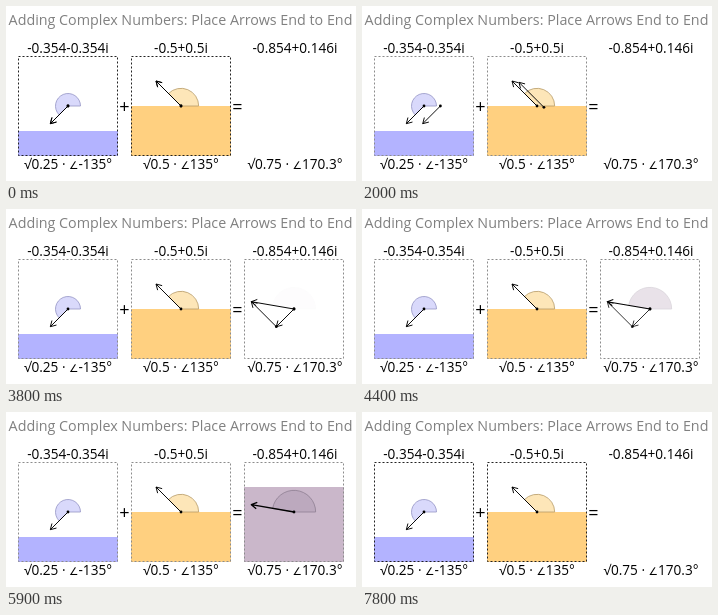
An HTML page for the animation above (7900 ms loop, 350x175 px).

```html
<!DOCTYPE html>
<html lang="en">
<head>
<meta charset="utf-8">
<title>Adding Complex Numbers</title>
<style>
  html, body { margin: 0; width: 100%; height: 100%; overflow: hidden; background: #fff; }
  svg { display: block; width: 100vw; height: 100vh; }
  text { font-family: "Open Sans", "Noto Sans", "DejaVu Sans", sans-serif; text-anchor: middle; font-size: 13.6px; }
  .title { font-size: 14.3px; fill: #808080; }
  .sign { font-size: 18px; }
  .angle { font-size: 10.5px; }
  .frame { fill: none; stroke-dasharray: 2 2; }
  .line { fill: none; stroke: #000; stroke-linejoin: round; }
</style>
</head>
<body>
<svg id="stage" viewBox="0 0 350 175"></svg>
<script>
const LOOP = 7900, STEP = 100, UNIT = 50, MID = 100;
const stage = document.getElementById('stage');

const terms = [
  { x: 62, re: -0.35355, im: -0.35355, fill: '#b3b3ff', fan: '#d9d9fb', edge: '#9595c4',
    sum: '-0.354-0.354i', root: '√0.25', angle: '-135°' },
  { x: 175, re: -0.5, im: 0.5, fill: '#ffd080', fan: '#fde6b8', edge: '#b79b68',
    sum: '-0.5+0.5i', root: '√0.5', angle: '135°' },
  { x: 288, re: -0.85355, im: 0.14645, fill: '#cab7ca', fan: '#bca9be', edge: '#8f7f92',
    sum: '-0.854+0.146i', root: '√0.75', angle: '170.3°' }
];

function add(parent, name, attrs, text) {
  const el = document.createElementNS('http://www.w3.org/2000/svg', name);
  for (const key in attrs) el.setAttribute(key, attrs[key]);
  if (text) el.textContent = text;
  parent.appendChild(el);
  return el;
}

const label = (x, y, text, cls = '') => add(stage, 'text', { x, y, class: cls }, text);

// Arrow with its tail at the local origin.
function arrow(parent, z) {
  const g = add(parent, 'g', { 'stroke-width': 0.9 });
  const x = z.re * UNIT, y = -z.im * UNIT;
  const len = Math.hypot(x, y), turn = Math.atan2(y, x) * 180 / Math.PI;
  add(g, 'circle', { r: 1.4 });
  add(g, 'path', {
    d: `M0 0H${len}m-5.5 -3.2L${len} 0l-5.5 3.2`,
    class: 'line', transform: `rotate(${turn})`
  });
  return g;
}

// Sector swept counterclockwise from the positive real axis.
function fanPath(z) {
  const r = Math.hypot(z.re, z.im) * UNIT / 2;
  const a = (Math.atan2(z.im, z.re) + 2 * Math.PI) % (2 * Math.PI);
  const large = a > Math.PI ? 1 : 0;
  return `M0 0H${r}A${r} ${r} 0 ${large} 0 ${r * Math.cos(a)} ${-r * Math.sin(a)}Z`;
}

function panel(z) {
  const g = add(stage, 'g', {});
  const at = `translate(${z.x} ${MID})`;
  const height = (z.re ** 2 + z.im ** 2) * 100;
  const level = add(g, 'rect', { x: z.x - 50, y: 150 - height, width: 100, height, fill: z.fill });
  const fan = add(g, 'path', { d: fanPath(z), transform: at, fill: z.fan, stroke: z.edge, 'stroke-width': 0.8 });
  const frame = add(g, 'rect', { x: z.x - 49.5, y: 50.5, width: 99, height: 99, class: 'frame' });
  const vector = arrow(g, z);
  vector.setAttribute('transform', at);
  return { g, level, fan, frame, vector };
}

label(174.5, 19, 'Adding Complex Numbers: Place Arrows End to End', 'title');
const panels = terms.map(panel);
for (const z of terms) {
  const x = z.x > 200 ? z.x + 1 : z.x;
  label(x, 47, z.sum);
  const polar = label(x, 163, z.root + ' · ');
  add(polar, 'tspan', { class: 'angle' }, '∠');
  add(polar, 'tspan', {}, z.angle);
}
label(118.5, 106.5, '+', 'sign');
label(231.5, 106.5, '=', 'sign');

const [first, second, total] = terms;
const copies = [first, second].map(z => arrow(stage, z));
const ends = [
  { x: total.x, y: MID },
  { x: total.x + first.re * UNIT, y: MID - first.im * UNIT }
];

function ease(t, from, to) {
  const u = Math.min(1, Math.max(0, (t - from) / (to - from)));
  return u * u * (3 - 2 * u);
}

function draw(time) {
  const t = Math.floor(time % LOOP / STEP) * STEP;
  const move = ease(t, 1700, 3520);
  copies.forEach((g, i) => {
    const x = terms[i].x + (ends[i].x - terms[i].x) * move;
    const y = MID + (ends[i].y - MID) * move;
    g.setAttribute('transform', `translate(${x} ${y})`);
    g.setAttribute('opacity', 1 - ease(t, 4000, 5600));
  });

  const result = panels[2];
  const fadeOut = t < 7300 ? 1 : (7800 - t) / 600;
  const grow = ease(t, 3600, 5700);
  result.g.setAttribute('opacity', ease(t, 2800, 3700) * fadeOut);
  result.fan.setAttribute('opacity', grow);
  result.vector.setAttribute('stroke-width', 0.9 + 0.4 * grow);
  result.level.setAttribute('opacity', ease(t, 4400, 5900));

  const ink = t < 100 || t >= 7800 ? '#222' : '#8c8c8c';
  for (const p of panels) p.frame.setAttribute('stroke', ink);
}

const start = performance.now();
function tick() {
  draw(performance.now() - start);
  requestAnimationFrame(tick);
}
tick();
</script>
</body>
</html>
```
